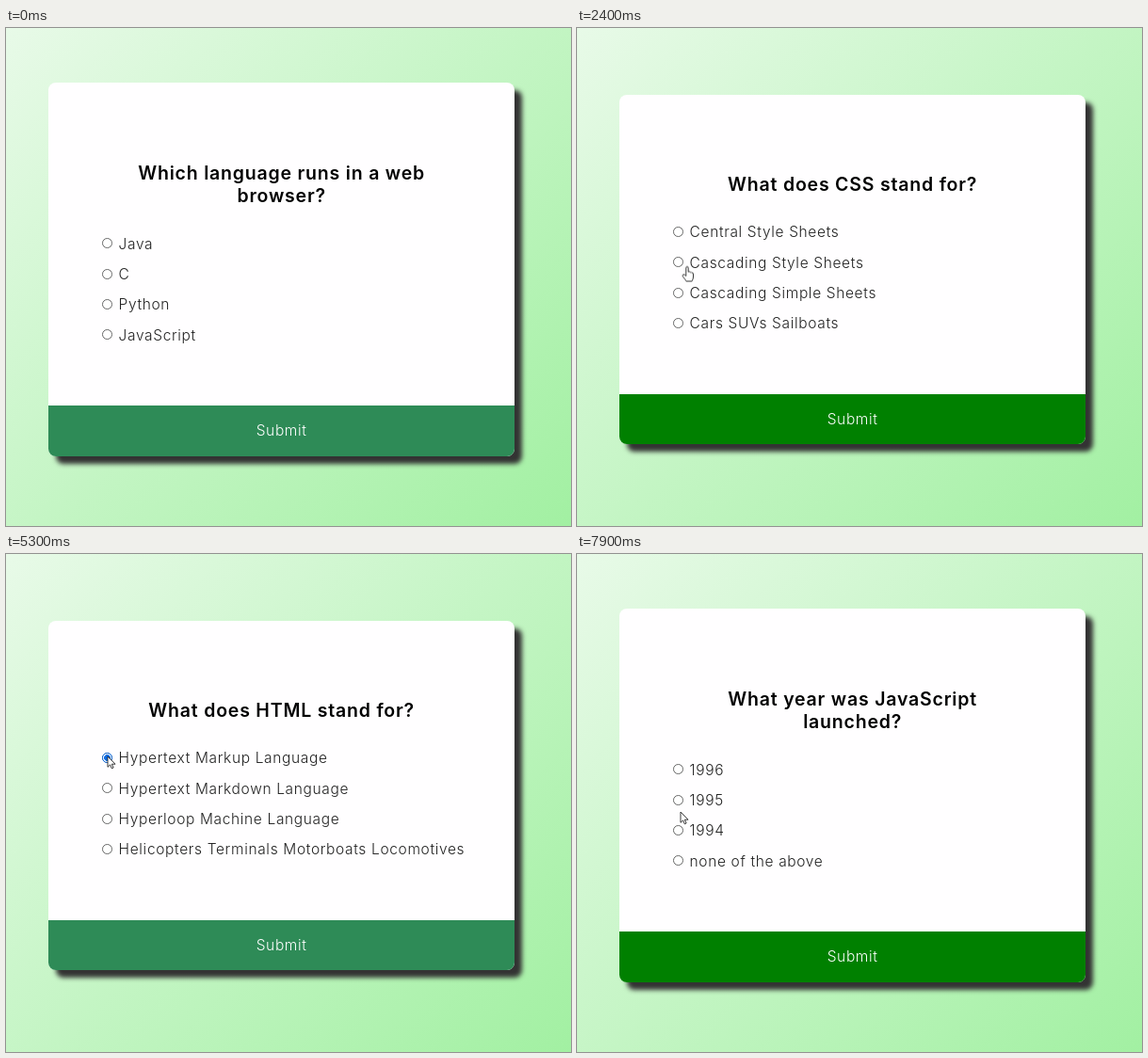
These frames come from a looping animation (600x529 px, 8000 ms). An HTML page:

```html
<!DOCTYPE html>
<html lang="en">
<head>
<meta charset="utf-8">
<title>Quiz</title>
<style>
  html, body { margin: 0; width: 100%; height: 100%; overflow: hidden; }
  body {
    position: relative;
    background: linear-gradient(135deg, #e8fae8, #c4f5c4 50%, #a2f0a2);
    font: 300 15.5px/32.35px Inter, "Open Sans", sans-serif;
    letter-spacing: .65px;
    color: #222;
  }
  .card, .card *, .cursor, .cursor * {
    animation-duration: 8s;
    animation-iteration-count: infinite;
    animation-timing-function: step-end;
  }
  .card {
    position: absolute;
    left: 45.3px;
    top: 58.3px;
    width: 494.7px;
    height: 396.3px;
    border-radius: 8px;
    overflow: hidden;
    background: #fffeff;
    box-shadow: 8px 8px 5px #333;
    visibility: hidden;
  }
  .card.short { top: 70.5px; height: 371.9px; }
  h2 {
    margin: 83.6px 0 22.8px;
    font-size: 19.5px;
    font-weight: 600;
    line-height: 24.4px;
    letter-spacing: .8px;
    text-align: center;
    color: #000;
  }
  ul { margin: 0; padding: 0; list-style: none; }
  li { position: relative; padding-left: 74.3px; height: 32.35px; white-space: nowrap; }
  li::before, .answer i {
    content: "";
    position: absolute;
    box-sizing: border-box;
    left: 56.7px;
    top: 9.7px;
    width: 11px;
    height: 11px;
    border: 1px solid #666;
    border-radius: 50%;
    background: #fff;
  }
  .answer i {
    border-color: #0d6be0;
    background: radial-gradient(#0d6be0 3.1px, #fff 3.7px);
    opacity: 0;
    animation-name: pick;
  }
  .submit {
    position: absolute;
    left: 0;
    bottom: 0;
    width: 100%;
    height: 53.4px;
    line-height: 53.4px;
    text-align: center;
    color: #fff;
    background: #2e8b57;
    animation-name: focus;
  }
  .cursor {
    position: absolute;
    left: 0;
    top: 0;
    width: 20px;
    height: 20px;
    overflow: visible;
    fill: #fff;
    stroke: #222;
    stroke-linejoin: round;
    animation-name: travel;
    animation-timing-function: ease-in-out;
  }
  .arrow { animation-name: arrow; }
  .hand { animation-name: hand; }

  #q1 { animation-name: first; }
  #q2 { animation-name: second; }
  #q3 { animation-name: third; }
  #q4 { animation-name: fourth; }
  @keyframes first { 0% { visibility: visible } 22.3%, 100% { visibility: hidden } }
  @keyframes second { 0%, 49.8%, 100% { visibility: hidden } 22.3% { visibility: visible } }
  @keyframes third { 0%, 76.1%, 100% { visibility: hidden } 49.8% { visibility: visible } }
  @keyframes fourth { 0% { visibility: hidden } 76.1%, 100% { visibility: visible } }

  @keyframes pick {
    0%, 22.3%, 49.8%, 76.1%, 100% { opacity: 0 }
    11.1%, 34.8%, 64.8% { opacity: 1 }
  }
  @keyframes focus {
    0%, 34.8%, 64.8% { background: #2e8b57 }
    19.8%, 46.1%, 72.4%, 100% { background: #008000 }
  }
  @keyframes travel {
    0%, 3.75% { transform: translate(210px, 375px) }
    8.75%, 13.75% { transform: translate(108px, 326px) }
    18.75% { transform: translate(211px, 406px) }
    20%, 22.5% { transform: translate(230px, 421px) }
    28.75%, 33% { transform: translate(117px, 253.5px) }
    35%, 38.75% { transform: translate(109px, 249px) }
    42.5% { transform: translate(159px, 371px) }
    46.25% { transform: translate(215px, 410px) }
    48%, 51% { transform: translate(222px, 415px) }
    60%, 62.5% { transform: translate(113px, 222px) }
    64%, 67% { transform: translate(108px, 215px) }
    72.5% { transform: translate(205px, 408px) }
    74%, 76.5% { transform: translate(215px, 420px) }
    82.5% { transform: translate(127px, 206px) }
    92% { transform: translate(113px, 258px) }
    98.75%, 100% { transform: translate(110px, 274px) }
  }
  @keyframes arrow {
    0%, 19.3%, 28%, 45.9%, 72.2% { opacity: 0 }
    3.75%, 24%, 34.3%, 53%, 78%, 100% { opacity: 1 }
  }
  @keyframes hand {
    0%, 24%, 34.3%, 53%, 78%, 100% { opacity: 0 }
    19.3%, 28%, 45.9%, 72.2% { opacity: 1 }
  }
</style>
</head>
<body>
  <section class="card" id="q1">
    <h2>Which language runs in a web<br>browser?</h2>
    <ul>
      <li>Java</li>
      <li>C</li>
      <li>Python</li>
      <li class="answer"><i></i>JavaScript</li>
    </ul>
    <div class="submit">Submit</div>
  </section>

  <section class="card short" id="q2">
    <h2>What does CSS stand for?</h2>
    <ul>
      <li>Central Style Sheets</li>
      <li class="answer"><i></i>Cascading Style Sheets</li>
      <li>Cascading Simple Sheets</li>
      <li>Cars SUVs Sailboats</li>
    </ul>
    <div class="submit">Submit</div>
  </section>

  <section class="card short" id="q3">
    <h2>What does HTML stand for?</h2>
    <ul>
      <li class="answer"><i></i>Hypertext Markup Language</li>
      <li>Hypertext Markdown Language</li>
      <li>Hyperloop Machine Language</li>
      <li>Helicopters Terminals Motorboats Locomotives</li>
    </ul>
    <div class="submit">Submit</div>
  </section>

  <section class="card" id="q4">
    <h2>What year was JavaScript<br>launched?</h2>
    <ul>
      <li>1996</li>
      <li>1995</li>
      <li>1994</li>
      <li>none of the above</li>
    </ul>
    <div class="submit">Submit</div>
  </section>

  <svg class="cursor" viewBox="0 0 20 20">
    <path class="arrow" stroke-width=".9" d="M0 0V11.3L2.6 8.9 4.3 12.8 6.1 12 4.4 8.2H8Z"/>
    <path class="hand" stroke-width=".9" d="M-1.2 9V1.2Q-1.2 0 0 0T1.2 1.2V5.5Q2.4 4.7 3.3 6 4.5 5.4 5.1 6.6 6.5 6.2 6.5 8V11Q6.5 13 5 15.5H-1Q-2 13.6-4.6 10.5-5.4 9-4.2 8.4-2.8 8-1.2 10Z"/>
  </svg>
</body>
</html>
```
